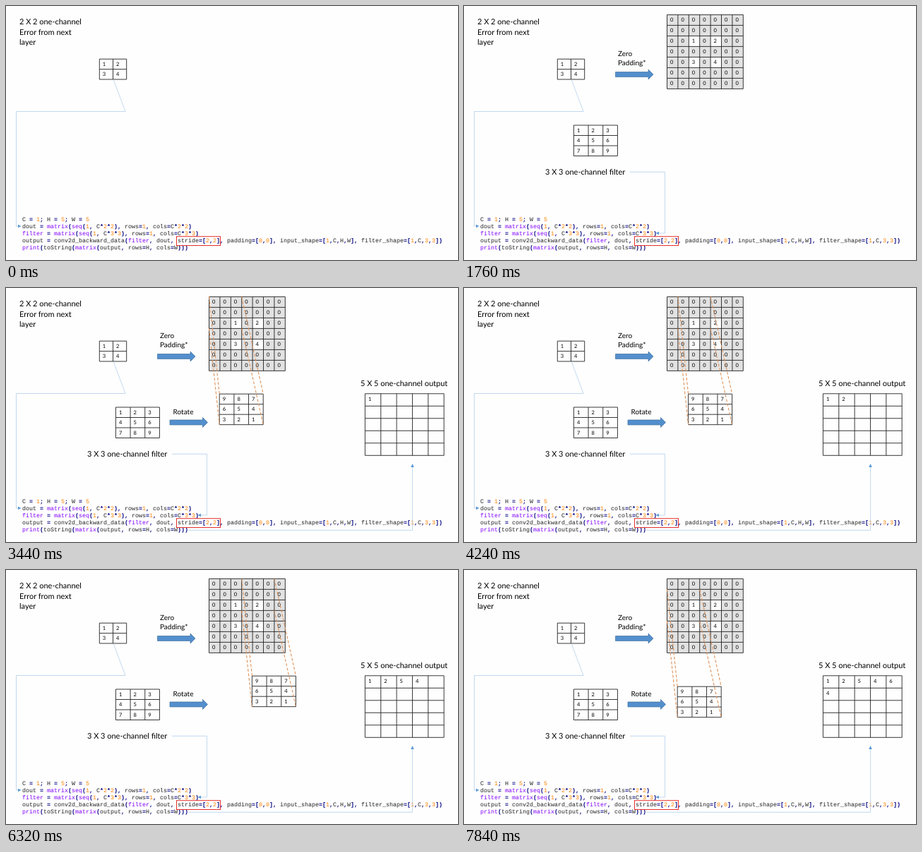
Write an HTML page that moves like this. It is 640 px wide and 360 px high and loops after 8000 ms.

```html
<!DOCTYPE html>
<html lang="en">
<head>
<meta charset="utf-8">
<title>Convolution backward data</title>
<style>
  html, body { margin: 0; width: 100%; height: 100%; overflow: hidden; background: #fefefe; }
  svg { display: block; width: 640px; height: 360px; }
  text { font-family: Lato, Carlito, sans-serif; fill: #000; white-space: pre; text-rendering: geometricPrecision; }
  .big { font-size: 10.97px; }
  .mid { font-size: 10px; }
  .num { font-size: 7.5px; text-anchor: middle; }
  .code { font-family: "Liberation Mono", "Courier New", monospace; font-size: 8.333px; fill: #222; }
  .key { fill: #8000ff; }
  .lit { fill: #ff8000; }
  .op { fill: #000080; font-weight: bold; }
  .grid { fill: none; stroke: #222; stroke-width: .9; }
  .wire { fill: none; stroke: #a9c9e8; stroke-width: .7; }
  .tip { fill: #5b9bd5; }
  .block { fill: #538fcd; stroke: #41719c; stroke-width: .7; }
  .ray { stroke: #df935a; stroke-width: 1.1; stroke-dasharray: 4 2.4; }
</style>
</head>
<body>
<svg id="stage" viewBox="0 0 640 360"></svg>
<script>
const LOOP = 8000;
const stage = document.getElementById('stage');

function add(parent, tag, attrs = {}, label) {
  const el = document.createElementNS('http://www.w3.org/2000/svg', tag);
  for (const k in attrs) el.setAttribute(k, attrs[k]);
  if (label !== undefined) el.textContent = label;
  parent.appendChild(el);
  return el;
}
const group = () => add(stage, 'g');
const path = (g, cls, d) => add(g, 'path', { class: cls, d });
const text = (g, cls, x, y, s) => add(g, 'text', { class: cls, x, y }, s);

// Table with values placed near the top left of each cell.
function table(g, x, y, cols, rows, cw, rh, values, shade) {
  const at = i => [x + (i % cols) * cw, y + Math.floor(i / cols) * rh];
  if (shade) {
    add(g, 'rect', { x, y, width: cols * cw, height: rows * rh, fill: '#e2e2e2' });
    values.forEach((v, i) => {
      const [cx, cy] = at(i);
      if (v) add(g, 'rect', { x: cx, y: cy, width: cw, height: rh, fill: '#fefefe' });
    });
  }
  let d = '';
  for (let c = 0; c <= cols; c++) d += `M${x + c * cw} ${y}v${rows * rh}`;
  for (let r = 0; r <= rows; r++) d += `M${x} ${y + r * rh}h${cols * cw}`;
  path(g, 'grid', d);
  return values.map((v, i) => {
    const [cx, cy] = at(i);
    return text(g, 'num', cx + 6.7, cy + 9.7, v);
  });
}

const blockArrow = (g, x, y) =>
  path(g, 'block', `M${x} ${y - 3.5}h46.5v-3.5l7 7l-7 7v-3.5h-46.5z`);

function codeLine(g, y, src) {
  const line = text(g, 'code', 23, y, '');
  const parts = src.match(/\b\d+\b|\w+|\s+|[^\w\s]/g);
  for (const p of parts) {
    const cls = /^\d/.test(p) ? 'lit'
      : /^(matrix|seq|filter|print)$/.test(p) ? 'key'
      : /^[^\w\s]/.test(p) ? 'op' : 'id';
    add(line, 'tspan', { class: cls }, p);
  }
}

// Always visible
const base = group();
['2 X 2 one-channel', 'Error from next', 'layer'].forEach((s, i) =>
  text(base, 'big', 19, 26.2 + i * 14.3, s));
table(base, 132.3, 75.2, 2, 2, 19.2, 14.4, [1, 2, 3, 4]);
path(base, 'wire', 'M152 104L169 149.5H14.5V312H18');
path(base, 'tip', 'M21.5 312l-4.5-2.2v4.4z');
[
  'C = 1; H = 5; W = 5',
  'dout = matrix(seq(1, C*2*2), rows=1, cols=C*2*2)',
  'filter = matrix(seq(1, C*3*3), rows=1, cols=C*3*3)',
  'output = conv2d_backward_data(filter, dout, stride=[2,2], padding=[0,0], input_shape=[1,C,H,W], filter_shape=[1,C,3,3])',
  'print(toString(matrix(output, rows=H, cols=W)))'
].forEach((s, i) => codeLine(base, 305.2 + i * 10.05, s));
add(base, 'rect', { x: 241.5, y: 326.7, width: 62, height: 12.8, fill: 'none', stroke: '#e5302c' });

// Zero padding
const pad = group();
text(pad, 'mid', 218, 71.3, 'Zero');
text(pad, 'mid', 218, 84.3, 'Padding*');
blockArrow(pad, 214.5, 97);
const padded = Array(49).fill(0);
[16, 18, 30, 32].forEach((cell, i) => padded[cell] = i + 1);
const GX = 287.5, GY = 12.4, CW = 15.4, RH = 15;
table(pad, GX, GY, 7, 7, CW, RH, padded, true);

// Filter
const kernel = group();
table(kernel, 155.4, 169, 3, 3, 20.67, 14.5, [1, 2, 3, 4, 5, 6, 7, 8, 9]);
text(kernel, 'big', 115, 239, '3 X 3 one-channel filter');
path(kernel, 'wire', 'M235 235.3H284.5V322H275');
path(kernel, 'tip', 'M271.5 322l4.5-2.2v4.4z');

// Rotated filter
const turn = group();
text(turn, 'mid', 236.6, 178.8, 'Rotate');
blockArrow(turn, 232, 190.5);
const FX = 302.2, FY = 150.2, FW = 62, FH = 43.5;
const mover = add(turn, 'g');
table(mover, FX, FY, 3, 3, FW / 3, FH / 3, [9, 8, 7, 6, 5, 4, 3, 2, 1]);

// Output
const out = group();
text(out, 'big', 502, 139, '5 X 5 one-channel output');
const results = [1, 2, 5, 4, 6, 4];
const cells = table(out, 508.4, 149.8, 5, 5, 22.35, 17.5, results);
path(out, 'wire', 'M258 343.3H575.5V253');
path(out, 'tip', 'M575.5 249l-2.3 5h4.6z');

// Rays between the corners of the window and of the filter
const rays = group();
for (const i of [0, 1]) for (const j of [0, 1])
  add(rays, 'line', {
    class: 'ray',
    x1: GX + i * 3 * CW, y1: GY + j * 3 * RH,
    x2: FX + i * FW, y2: FY + j * FH
  });

const cues = [[pad, 960], [kernel, 1760], [turn, 2560], [out, 3440], [rays, 3440]];
const steps = [3440, 4240, 5040, 5840, 6640, 7520];
const show = (el, on) => el.setAttribute('visibility', on ? 'visible' : 'hidden');

function draw(t) {
  for (const [g, at] of cues) show(g, t >= at);
  const done = steps.filter(s => t >= s).length;
  cells.forEach((c, i) => show(c, i < done));
  const k = Math.max(0, done - 1);
  const shift = `translate(${(k % 5) * CW} ${Math.floor(k / 5) * RH})`;
  mover.setAttribute('transform', shift);
  rays.setAttribute('transform', shift);
}

const start = performance.now();
function tick() {
  draw((performance.now() - start) % LOOP);
  requestAnimationFrame(tick);
}
tick();
</script>
</body>
</html>
```
